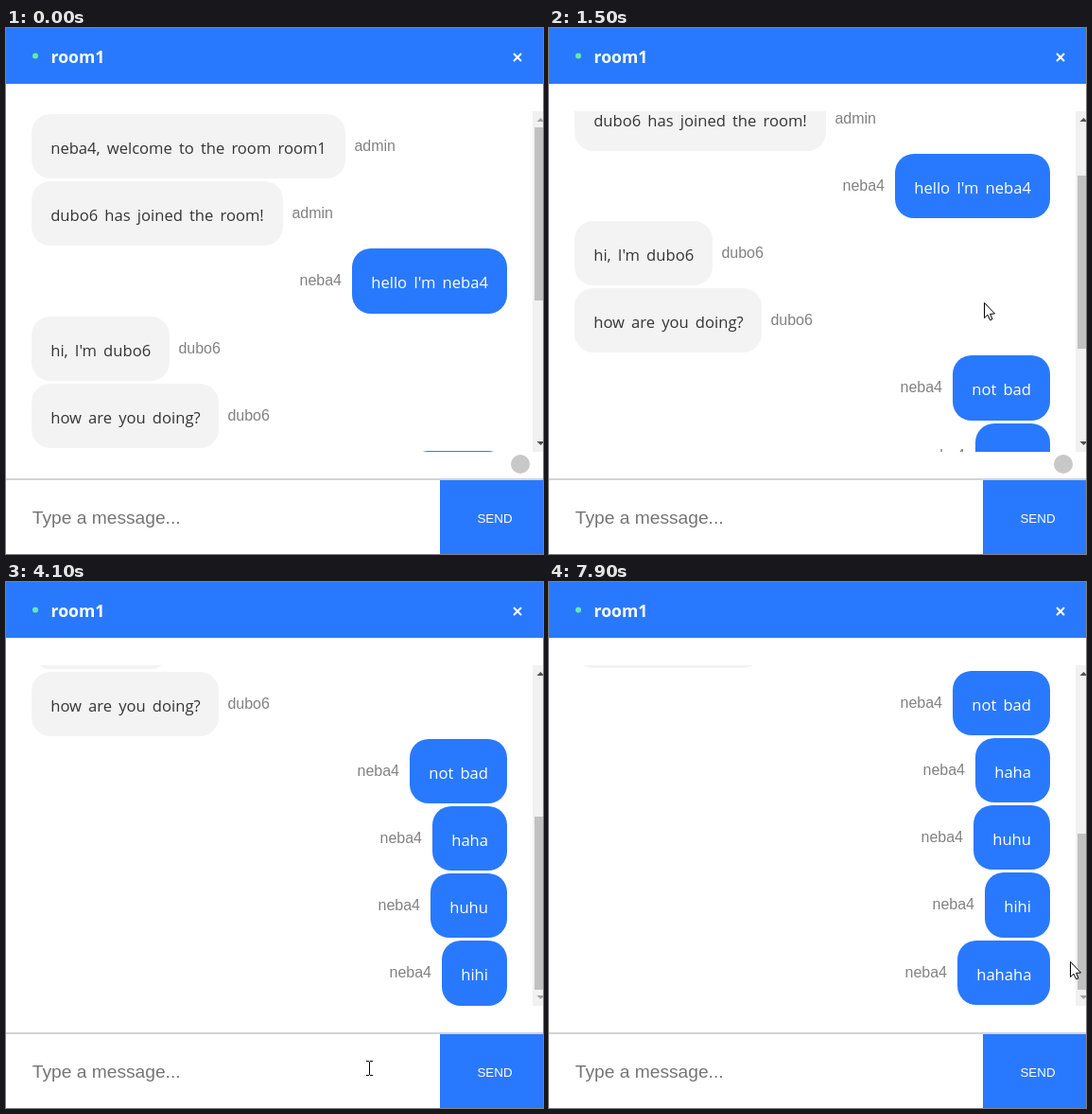
These frames come from a looping animation (568x556 px, 8000 ms). An HTML page with a canvas:

```html
<!DOCTYPE html>
<html lang="en">
<head>
<meta charset="utf-8">
<title>Chat room</title>
<style>
html, body { margin: 0; width: 100%; height: 100%; overflow: hidden; background: #fff; }
canvas { display: block; }
</style>
</head>
<body>
<canvas id="stage" width="568" height="556"></canvas>
<script>
const ctx = document.getElementById('stage').getContext('2d');
const LOOP = 8000, STEP = 100, TYPE_AT = 4900, SEND_AT = 6600;
const BLUE = '#2979ff';
const UI = '"Liberation Sans", Arial, sans-serif';
const CHAT = '"Open Sans", "Noto Sans", sans-serif';
const ME = 'neba4', PEER = 'dubo6', DRAFT = 'hahaha';
const TOP = 88, VIEW = 360;       // message viewport
const PITCH = 71.18, BUBBLE = 68.2;

const messages = [
  ['admin', `${ME}, welcome to the room room1`],
  ['admin', `${PEER} has joined the room!`],
  [ME, `hello I'm ${ME}`],
  [PEER, `hi, I'm ${PEER}`],
  [PEER, 'how are you doing?'],
  [ME, 'not bad'],
  [ME, 'haha'],
  [ME, 'huhu'],
  [ME, 'hihi'],
  [ME, DRAFT]
];

// Progress of a move from time a to time b, clamped to 0..1
const ramp = (t, a, b) => Math.min(1, Math.max(0, (t - a) / (b - a)));
const smooth = (t, a, b) => { const u = ramp(t, a, b); return u * u * (3 - 2 * u); };
const easeOut = (t, a, b) => 1 - (1 - ramp(t, a, b)) ** 2;

// Wheel down and back, jump to the end, then follow the new message
function scrollAt(t) {
  return 201 * (smooth(t, 825, 1300) - smooth(t, 1300, 1700))
    + 281 * easeOut(t, 2800, 3188)
    + 72 * easeOut(t, 6550, 6900);
}

function pointerAt(t) {
  let x = 518, y = 303;
  const move = (a, b, toX, toY) => {
    const k = smooth(t, a, b);
    x += (toX - x) * k;
    y += (toY - y) * k;
  };
  move(0, 700, 460, 290);
  move(1700, 2400, 548, 454);
  move(3500, 4300, 354, 525);
  move(6700, 7200, 530, 352);
  move(7400, 7900, 551, 401);
  return [Math.round(x), Math.round(y)];
}

function rect(x, y, w, h, color, radius = 0) {
  ctx.fillStyle = color;
  ctx.beginPath();
  ctx.roundRect(x, y, w, h, radius);
  ctx.fill();
}

function disc(x, y, r, color) {
  rect(x - r, y - r, 2 * r, 2 * r, color, r);
}

function setFont(font, gap = 0) {
  ctx.font = font;
  ctx.wordSpacing = gap + 'px';
}

function text(str, x, y, color, align = 'left') {
  ctx.fillStyle = color;
  ctx.textAlign = align;
  ctx.fillText(str, x, y);
}

function drawHeader() {
  rect(0, 0, 568, 59, BLUE);
  disc(31, 29.5, 3, '#69e8a8');
  setFont('bold 17.6px ' + CHAT);
  text('room1', 47.5, 37, '#fff');
  ctx.strokeStyle = '#fff';
  ctx.lineWidth = 2;
  ctx.beginPath();
  for (const s of [-4, 4]) {
    ctx.moveTo(541 - s, 27);
    ctx.lineTo(541 + s, 35);
  }
  ctx.stroke();
}

function drawMessage([name, str], top) {
  const y = Math.round(top), h = Math.round(top + BUBBLE) - y;
  const mine = name === ME;
  setFont('16.6px ' + CHAT, 2.8);
  const w = Math.round(ctx.measureText(str).width + 40);
  const x = mine ? 530 - w : 27;
  rect(x, y, w, h, mine ? BLUE : '#f3f3f3', 20);
  text(str, x + 20.2, y + 42, mine ? '#fff' : '#353535');
  setFont('16px ' + UI);
  text(name, mine ? x - 11 : x + w + 9.4, y + 39, '#828282', mine ? 'right' : 'left');
}

function drawMessages(count, scroll) {
  ctx.save();
  ctx.beginPath();
  ctx.rect(0, TOP, 557, VIEW);
  ctx.clip();
  messages.slice(0, count).forEach((m, i) => drawMessage(m, 91 + PITCH * i - scroll));
  ctx.restore();
}

function drawChevron(y, dir, active) {
  ctx.fillStyle = active ? '#505050' : '#a3a3a3';
  ctx.beginPath();
  ctx.moveTo(561.5, y - 2 * dir);
  ctx.lineTo(565.5, y + 2 * dir);
  ctx.lineTo(569.5, y - 2 * dir);
  ctx.fill();
}

function drawScrollbar(count, scroll) {
  const content = 1.2 + PITCH * (count - 1) + 70.4;
  const max = content - VIEW, track = VIEW - 34;
  const size = Math.round(track * VIEW / content);
  const y = Math.round(TOP + 17 + Math.min(1, scroll / max) * (track - size));
  rect(557, TOP, 11, VIEW, '#f1f1f1');
  rect(559, y, 9, size, '#c1c1c1');
  drawChevron(97, -1, scroll > 0);
  drawChevron(439, 1, scroll < max - 1);
}

function drawInput(t) {
  rect(0, 476, 568, 2, '#d3d3d3');
  rect(459, 478, 109, 78, BLUE);
  setFont('13.333px ' + UI);
  text('SEND', 517, 523, '#fff', 'center');

  const typing = t >= TYPE_AT && t < SEND_AT;
  const typed = typing ? DRAFT.slice(0, 1 + Math.floor((t - TYPE_AT) / 120)) : '';
  setFont('19.2px ' + UI);
  text(typed || 'Type a message...', 27.8, 524, typed ? '#000' : '#757575');
  const blink = at => t >= at && t < at + 500;
  if (typing || blink(4200) || blink(7100)) {
    rect(Math.round(28 + ctx.measureText(typed).width), 508, 1, 20, '#000');
  }
}

function drawArrow() {
  ctx.fill(arrow);
  ctx.stroke(arrow);
}
const arrow = new Path2D('M.5 .5V16.5L4 13.2 6.5 18.8 9 17.8 6.6 12.3 11.5 12Z');

function drawBeam() {
  rect(0, -7, 1, 14, '#000');
  for (const y of [-8, 7]) {
    rect(-3, y, 3, 1, '#000');
    rect(1, y, 3, 1, '#000');
  }
}

function drawHand() {
  rect(-6, 7, 18, 15, '#000', 5);
  rect(-2, 0, 5, 14, '#000', 2);
  rect(-5, 8, 16, 13, '#fff', 4);
  rect(-1, 1, 3, 13, '#fff', 1);
}

function drawPointer(t) {
  if (t < 100) return;
  const [x, y] = pointerAt(t);
  ctx.save();
  ctx.translate(x, y);
  ctx.fillStyle = '#fff';
  ctx.strokeStyle = '#000';
  ctx.lineWidth = 1;
  const overButton = t >= 2600 && t < 2900;
  if (y > 478 && x < 459) drawBeam();
  else if (overButton || y > 478) drawHand();
  else drawArrow();
  ctx.restore();
}

function draw(t) {
  const scroll = scrollAt(t);
  const count = t < SEND_AT ? 9 : 10;
  rect(0, 0, 568, 556, '#fff');
  drawHeader();
  drawMessages(count, scroll);
  drawScrollbar(count, scroll);
  if (t < 2900) disc(544, 461, 10, '#c8c8c8');
  drawInput(t);
  drawPointer(t);
}

function tick(now) {
  draw(Math.floor(now % LOOP / STEP) * STEP);
  requestAnimationFrame(tick);
}
draw(0);
requestAnimationFrame(tick);
</script>
</body>
</html>
```
